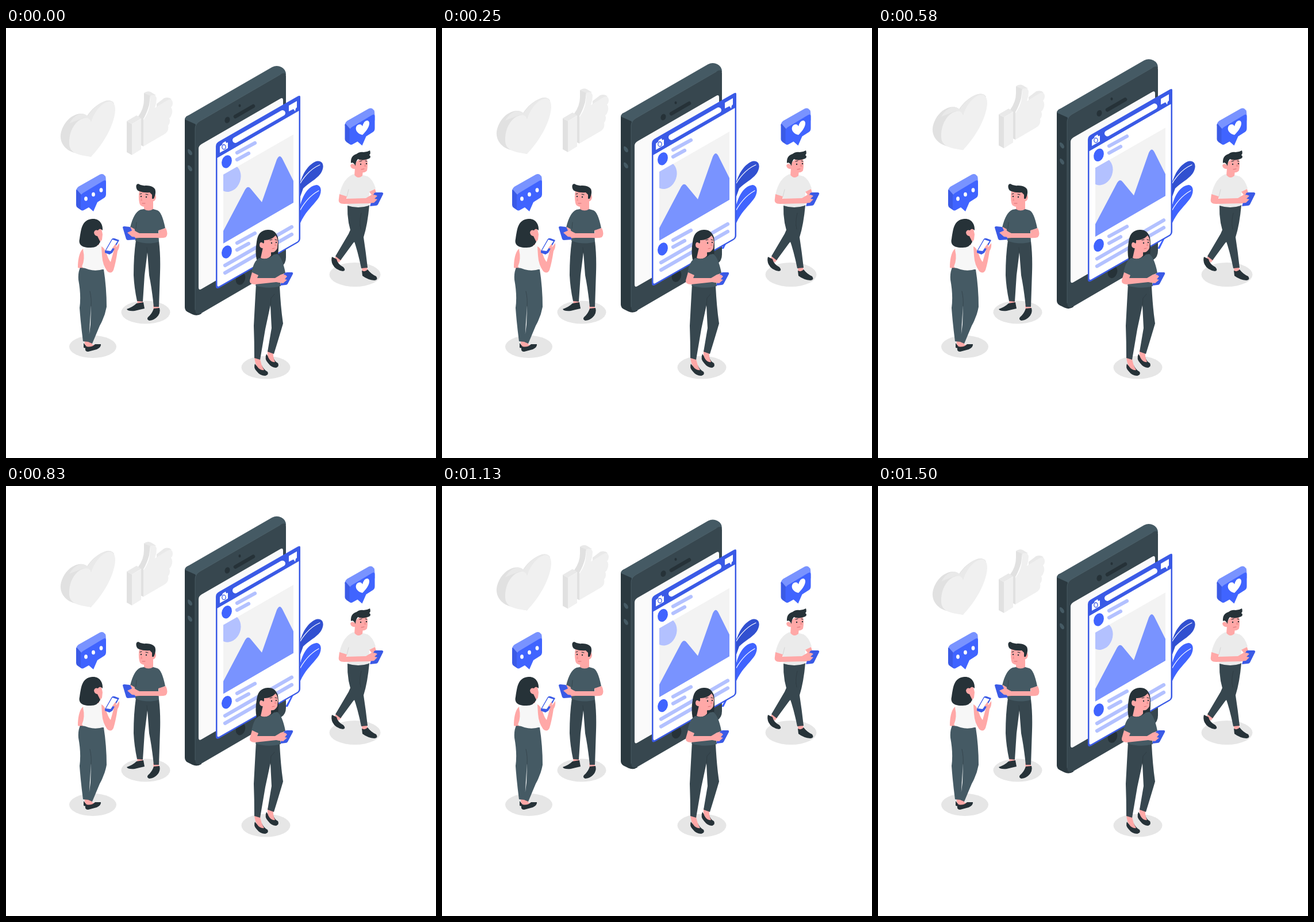
An HTML page that plays this animation: 748 by 748 pixels, repeating every 1540 ms.

```html
<!DOCTYPE html>
<html lang="en">
<head>
<meta charset="utf-8">
<title>Social feed</title>
<style>
html, body { margin: 0; height: 100%; overflow: hidden; background: #fff }
svg { display: block; width: 100vw; height: 100vh }
.blue { fill: #4064ff } .deep { fill: #3a5ae6 } .navy { fill: #3150d0 }
.mid { fill: #7993ff } .pale { fill: #b3c1ff }
.ink { fill: #263238 } .slate { fill: #37474f } .steel { fill: #455a64 }
.skin { fill: #ffa8a7 } .blush { fill: #f28f8f } .white { fill: #fff }
.g1 { fill: #f0f0f0 } .g2 { fill: #e9e9e9 } .g3 { fill: #e1e1e1 } .shade { fill: #e6e6e6 }
.line { fill: none; stroke-linecap: round; stroke-linejoin: round }
.bar { stroke: #b3c1ff; stroke-width: 6.2 }
.brow { stroke: #263238; stroke-width: 1.1 }
.lip { stroke: #d96f73; stroke-width: 1 }
.fold { stroke: #263238; stroke-width: .8; opacity: .6 }
</style>
</head>
<body>
<svg viewBox="0 0 748 748">
<defs>
  <g id="bubble">
    <path class="mid" d="M122 284Q122 279 126 276L163 255Q167 253 170 255L173 258Q174 260 174 275L131 300Z"/>
    <path class="deep" d="M122 283Q122 280 124 282L131 290V317L125 313Q122 311 122 308Z"/>
    <path class="blue" d="M130 293Q130 290 134 287L169 266Q174 263 174 268V289Q174 294 170 296L159 303L152 319L144 312L135 317Q130 319 130 314Z"/>
  </g>
  <g id="author">
    <ellipse class="blue" cx="384" cy="232.500" rx="8.500" ry="11.500" transform="rotate(20 384 232.500)"/>
    <path class="line bar" d="M402 217L433 200M402 229L422 218"/>
  </g>
  <clipPath id="photo"><path d="M378 255L500 185V304L378 375Z"/></clipPath>
</defs>

<!-- leaves -->
<path class="navy" d="M506 310C506 272 518 243 537 233C548 228 555 236 550 248C545 261 528 268 517 279Z"/>
<path class="blue" d="M486 384L505 350C508 310 518 276 540 273C551 274 549 289 542 298C532 311 524 317 515 333L490 384Z"/>
<path class="line" stroke="#fff" stroke-width="1.2" d="M508 277Q523 248 546 238M508 324Q522 295 544 283"/>

<g id="float">
  <!-- heart -->
  <path class="g3" d="M148 224L119 217C102 212 94 199 95 186C98 166 113 150 130 149Q137 149 141 153C148 142 158 133 170 128Q181 123 188 131L176 160Z"/>
  <path class="g2" d="M110 166C117 154 126 149 133 149Q138 150 142 153C150 141 160 132 171 128Q181 124 187 129C170 132 156 146 148 162Q143 154 133 157Z"/>
  <path class="g1" d="M148 224C128 221 109 219 110 199C110 178 121 161 135 157Q145 154 148 163C154 146 165 131 178 128Q190 126 190 143C188 172 167 204 148 224Z"/>
  <!-- thumb -->
  <path class="g3" d="M210 162L219 167V221L210 216Z"/>
  <path class="g2" d="M210 162L227 152L236 157L219 167Z"/>
  <path class="g1" d="M219 167L235 158V211L219 221Z"/>
  <path class="g3" d="M240 113L251 117L249 134Q245 148 239 158V206L235 204V157L230 154Q240 140 240 125Z"/>
  <path class="g2" d="M240 113Q247 108 253 112L261 117L251 118ZM262 132L275 122Q283 119 288 124L262 138Z"/>
  <path class="g1" d="M251 118Q260 114 262 122Q262 131 259 139L280 126Q289 121 290 130Q290 136 287 138Q291 143 288 151Q287 155 284 157Q287 164 282 170Q284 180 275 185L239 206V160Q248 148 250 134Z"/>
  <!-- phone -->
  <path fill="#2b3940" d="M311 160Q311 154 318 152L340 165V497Q332 502 324 498L316 494Q311 491 311 486Z"/>
  <path class="steel" d="M311 159Q312 154 319 151L463 68Q471 64 479 68Q487 72 487 81L335 175L329 167Z"/>
  <path class="slate" d="M329 175Q329 167 337 162L477 81Q487 75 487 84V399Q487 410 479 415L340 496Q329 501 329 490Z"/>
  <path class="line" stroke="#52666f" stroke-width=".7" d="M329 490V175Q329 167 337 162L477 81"/>
  <path class="steel" d="M316 213Q316 209 320 212Q324 215 324 219Q323 223 319 220Q316 217 316 213ZM316 241Q316 237 320 240Q324 243 324 247Q323 251 319 248Q316 245 316 241Z"/>
  <path fill="#fafafa" d="M335 210Q335 205 340 202L477 123Q482 120 482 126V372L340 454Q335 457 335 451Z"/>
  <ellipse class="ink" cx="385" cy="160" rx="4.400" ry="5.600" transform="rotate(20 385 160)"/>
  <ellipse class="ink" cx="406.500" cy="135" rx="2" ry="2.600"/>
  <path class="line" stroke="#263238" stroke-width="6.5" d="M399 154L430 136"/>
  <ellipse class="ink" cx="408" cy="436" rx="8" ry="11" transform="rotate(18 408 436)"/>
  <!-- feed panel -->
  <path class="deep" d="M365 206Q365 200 371 197L507 119Q512 116 512 120V366Q512 371 507 374L371 452Q365 455 365 449Z"/>
  <path class="white" d="M367.500 226L509.500 144V366Q509.500 370 506 372L371 449Q367.500 451 367.500 447Z"/>
  <path class="line" stroke="#fff" stroke-width="10" d="M399 195L481 148"/>
  <path class="white" d="M372 206L376 203L377 200L382 197L383 200L386 199V209L372 217ZM492 135L506 127V138L504 140L503 145L500 141L492 145Z"/>
  <ellipse cx="379" cy="207" rx="3.200" ry="4" fill="none" stroke="#3a5ae6" stroke-width="1.300"/>
  <g clip-path="url(#photo)">
    <path fill="#f3f3f3" d="M378 255L500 185V304L378 375Z"/>
    <ellipse class="pale" cx="388" cy="261" rx="20" ry="24.500" transform="rotate(20 388 261)"/>
    <path class="mid" d="M378 353L416 281Q421 273 426 280L445 303L471 229Q476 218 481 228L500 266V304L378 375Z"/>
  </g>
  <use href="#author"/>
  <use href="#author" y="157"/>
  <path class="line bar" d="M381 413L497 346M381 426L497 359"/>
</g>

<g class="shade">
  <ellipse cx="151" cy="554.500" rx="41" ry="19.500"/>
  <ellipse cx="243" cy="494.500" rx="42.500" ry="20"/>
  <ellipse cx="452" cy="590.500" rx="42.500" ry="20"/>
  <ellipse cx="607" cy="429" rx="44.500" ry="21"/>
</g>

<!-- speech bubbles -->
<use href="#bubble"/>
<g class="white">
  <ellipse cx="139" cy="297" rx="2.900" ry="3.800"/>
  <ellipse cx="152" cy="289.500" rx="2.900" ry="3.800"/>
  <ellipse cx="165.500" cy="282" rx="2.900" ry="3.800"/>
</g>
<use href="#bubble" x="467.500" y="-114.500"/>
<path class="white" d="M620 186C607 183 606 171 613 168Q618 166 620 171Q623 160 629 161C635 163 632 175 620 186Z"/>

<!-- woman seen from behind -->
<path class="skin" d="M136 540H150V551L156 551L150 556H138ZM134 384C127 390 125 404 125 417L133 419L138 396Z"/>
<path class="ink" d="M135 548L140 554Q149 556 155 550L165 550Q166 555 158 559L143 563Q137 563 138 557L135 556Z"/>
<path class="steel" d="M129 417L170 420Q175 452 175 485Q172 502 163 518L150 549L143 546L147 516L148 482L146 512L144 546L134 545Q130 515 128 487Q131 465 126 438Q125 425 129 417Z"/>
<path class="line fold" d="M148 484Q149 470 146 458"/>
<path class="skin" d="M150 370H162V382L152 386ZM156 346Q165 345 167 354L168 359L167 368Q164 374 157 372Z"/>
<path fill="#f7f7f7" d="M138 383L163 377Q172 384 172 396L171 419Q151 426 132 415Q138 402 134 386Z"/>
<path class="skin" d="M166 380C174 383 175 398 182 407L187 389L184 384L188 380L192 381L197 374Q198 382 194 388Q191 408 187 421Q183 429 176 423Q168 412 167 396Z"/>
<path class="ink" d="M150 332C163 331 169 342 168 352Q163 347 160 352Q155 357 159 362L164 372Q159 383 145 382C130 382 126 375 128 367C131 348 132 334 150 332Z"/>
<path class="skin" d="M160 352Q154 350 153 356Q154 362 160 362Z"/>
<path class="deep" d="M172 388L184 367Q186 365 189 366L197 369L185 391L180 394L172 391Z"/>
<path class="white" d="M174 387L185 368L194 371L182 388Z"/>
<path class="skin" d="M185 383L190 376L192 378L190 384Z"/>

<!-- man facing left -->
<path class="skin" d="M228 472H238V482L229 484ZM256 482H266V491L257 493Z"/>
<path class="ink" d="M227 479L239 477L241 488Q232 490 224 492Q212 493 210 489Q221 485 227 479ZM257 488L267 487Q269 494 265 500Q258 509 249 509Q244 507 247 503Q254 497 257 488Z"/>
<path class="slate" d="M226 369L266 371Q269 395 268 425L266 485L257 485Q254 455 249 430L246 390L241 430L238 476L228 475Q223 452 222 430Q222 396 226 369Z"/>
<path class="line fold" d="M246 392L245 382"/>
<path class="skin" d="M240 303L256 300V317Q250 323 240 317Z"/>
<path class="steel" d="M234 316L240 315Q248 320 256 315L263 317Q271 319 277 348L265 353L266 372Q245 378 225 370L224 352L216 347Q222 321 234 316Z"/>
<path class="line fold" d="M227 338L226 349"/>
<path class="skin" d="M265 352L278 348Q283 359 278 364Q273 366 262 365L232 365L219 366L212 361L208 354L213 351L216 355L222 352L232 357L266 357ZM217 346L224 350L223 355L215 354Z"/>
<path class="deep" d="M203 347Q203 345 206 345L215 346Q217 347 218 350L226 368L212 369Q210 369 209 367Z"/>
<path class="skin" d="M211 356L222 351L230 357L228 364L219 363Z"/>
<path class="skin" d="M232 283L254 286Q261 288 261 295Q259 303 254 301Q252 309 245 311Q233 312 232 304Q230 294 232 283Z"/>
<path class="ink" d="M227 279Q225 272 230 271Q236 275 243 274Q255 274 259 280Q262 286 257 297L254 297V290L250 286Q240 287 232 284Q228 283 227 279Z"/>
<path class="blush" d="M236 295L234 300L237 301Z"/>
<path class="line brow" d="M233 289L236 288M243 289L247 290"/>
<path class="line lip" d="M237 305L242 305"/>

<!-- woman in front -->
<path class="ink" d="M433 584Q438 592 445 587Q448 594 455 598Q458 603 451 605Q442 605 436 597Q430 591 433 584ZM453 567Q459 577 465 573Q467 580 473 583Q476 588 470 591Q462 591 456 583Q449 576 453 567Z"/>
<path class="skin" d="M432 572L442 574Q443 585 449 595Q442 596 437 589Q433 584 432 572ZM455 561L465 563Q464 573 468 581Q462 582 458 576Q454 571 455 561Z"/>
<path class="slate" d="M435 445L476 449Q478 488 482 514Q475 538 466 567L455 563L462 522L460 482L451 524L442 577L432 574Q432 545 431 518Q433 480 435 445Z"/>
<path class="line fold" d="M460 484L461 470L467 463"/>
<path class="ink" d="M455 351Q438 352 436 372Q433 390 436 403Q455 408 473 397Q475 375 473 364Q468 350 455 351Z"/>
<path class="skin" d="M447 382L461 384V396Q453 405 443 400Z"/>
<path class="steel" d="M441 400Q454 405 466 394L472 393Q481 400 486 426L476 431L478 449Q456 455 434 448L438 430L427 426Q431 404 441 400Z"/>
<path class="skin" d="M428 425L439 430L437 435L468 435L478 429L485 427L492 430L489 438L482 444L470 442L433 446Q423 446 424 439Z"/>
<path class="deep" d="M484 427Q486 425 489 425L498 425Q500 426 499 428L490 445Q489 447 486 447L477 448Z"/>
<path class="skin" d="M473 434L485 429L489 432L485 437L489 438L482 444L472 442Z"/>
<path class="skin" d="M449 367Q460 365 466 358Q472 362 473 372L472 383Q468 392 458 390Q451 389 449 383Q441 384 441 377Q442 370 449 374Z"/>
<path class="ink" d="M440 374Q440 358 456 355Q466 354 469 361Q460 370 449 369L448 375Q443 370 440 374Z"/>
<path class="blush" d="M468 374L471 379H467Z"/>
<path class="line brow" d="M459 369L463 368M468 368L471 369"/>
<path class="line lip" d="M463 384L467 383"/>

<!-- walking man -->
<path class="skin" d="M575 395L584 402L579 408L571 402ZM618 414L628 415L629 424L620 424Z"/>
<path class="ink" d="M567 398L575 402Q577 411 587 416Q592 422 586 423Q573 421 568 411Q565 404 567 398ZM619 422Q625 425 629 420Q635 428 644 432Q648 438 641 439Q629 438 620 431Z"/>
<path class="slate" d="M606 335L618 362Q610 368 604 374L582 404L573 397L596 358ZM594 309L632 308Q629 342 622 364Q626 390 629 417L618 418Q612 388 604 366Q593 340 594 309Z"/>
<path class="line fold" d="M618 322Q614 338 617 350"/>
<path class="skin" d="M607 244L621 246L620 258Q613 266 606 257Z"/>
<path fill="#ebebeb" d="M605 254Q612 265 621 256L629 258Q638 263 643 279L632 286L631 309Q613 315 594 309L593 293L580 290Q586 261 605 254Z"/>
<path class="line" stroke="#d4d4d4" d="M596 281L593 293"/>
<path class="skin" d="M580 289L593 293L592 297L626 296L636 290L632 285L642 280L646 294L641 304L633 305L588 306Q577 306 579 297Z"/>
<path class="deep" d="M640 288Q641 286 644 286L654 286Q657 287 656 289L647 307Q646 309 643 309L633 310Z"/>
<path class="skin" d="M628 296L641 290L646 292L641 297L646 298L640 304L629 305Z"/>
<path class="skin" d="M607 236Q615 224 628 229Q630 238 628 248Q624 253 615 251Q609 250 608 245Q600 246 599 239Q601 234 607 238Z"/>
<path class="ink" d="M600 235Q599 222 610 219Q615 215 622 216Q628 216 633 213Q635 218 632 221Q636 224 632 227Q621 232 612 228Q608 233 608 240Q604 232 600 235Z"/>
<path class="blush" d="M624 236L627 241H623Z"/>
<path class="line brow" d="M615 232L619 231M625 231L628 232"/>
<path class="line lip" d="M618 246L623 245"/>

<!-- eyes -->
<g class="ink">
  <circle cx="235" cy="293" r="1.200"/><circle cx="244" cy="294" r="1.200"/>
  <circle cx="462" cy="374" r="1.200"/><circle cx="470" cy="373" r="1.200"/>
  <circle cx="617" cy="237" r="1.200"/><circle cx="627" cy="236" r="1.200"/>
</g>
</svg>
<script>
const LOOP = 1540, RISE = 1500, HEIGHT = 14.96, STEP = 1000 / 24;
const floating = document.getElementById('float');

function draw(now) {
  // Linear bob, sampled at 24 steps per second
  const t = Math.floor((now % LOOP + 4.9) / STEP) * STEP;
  const lift = Math.max(0, Math.min(t, RISE - t)) / (RISE / 2) * HEIGHT;
  floating.setAttribute('transform', `translate(0 ${-lift})`);
  requestAnimationFrame(draw);
}
draw(performance.now());
</script>
</body>
</html>
```
